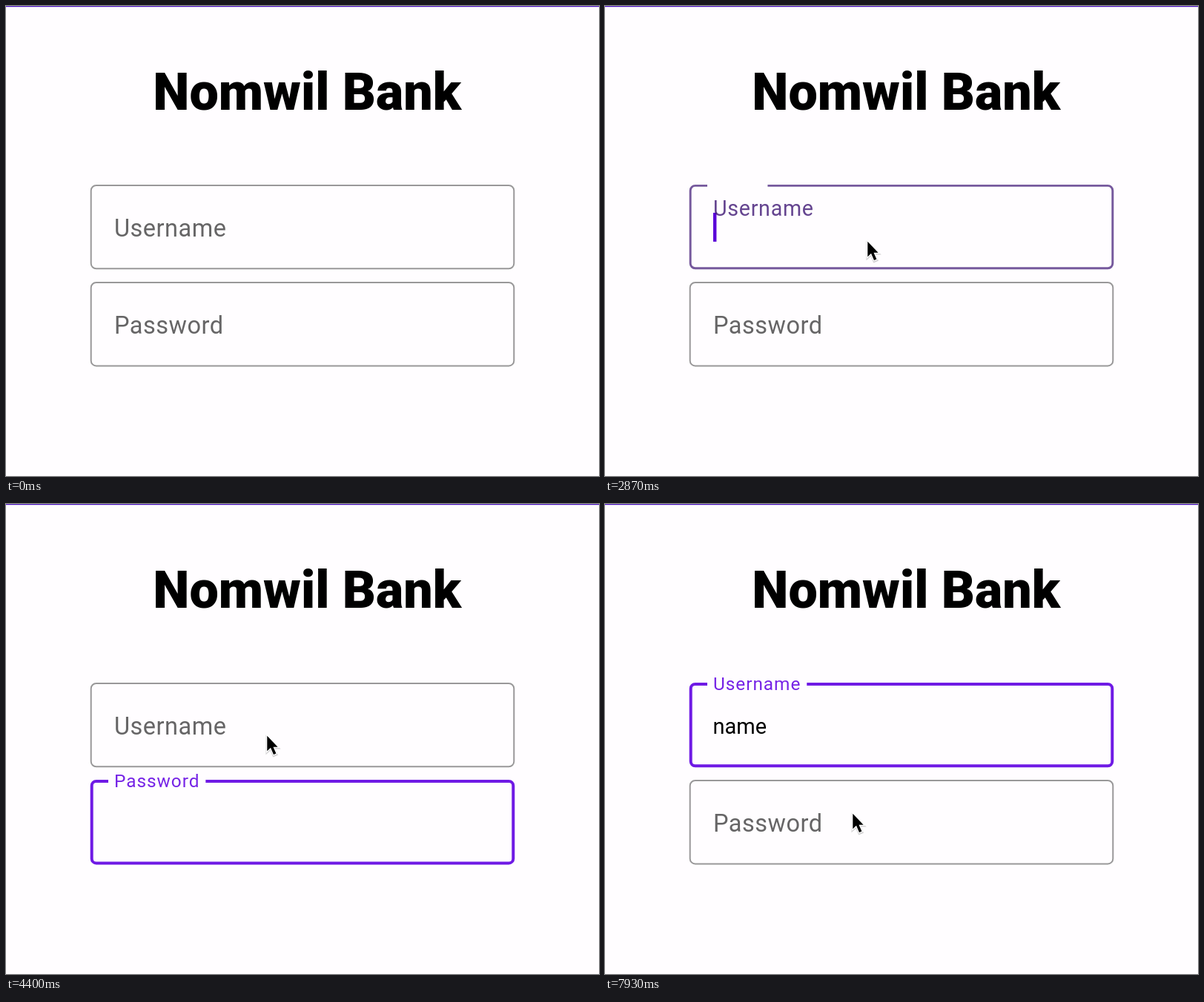
Write an HTML page that moves like this. It is 800 by 634 pixels and loops after 8 s.

```html
<!DOCTYPE html>
<html lang="en">
<head>
<meta charset="utf-8">
<title>Login form</title>
<style>
  html, body { margin: 0; width: 100%; height: 100%; overflow: hidden; background: #fffdff; }
  svg { display: block; width: 800px; height: 634px; font-family: Roboto, sans-serif; }
</style>
</head>
<body>
<svg id="stage" viewBox="0 0 800 634">
  <rect width="800" height="634" fill="#fffdff"/>
  <rect width="800" height="1.2" fill="#4a14bd"/>
  <text x="614" y="140" font-size="70" font-weight="800" text-anchor="end">Nomwil Bank</text>
  <g id="fields"></g>
  <g id="pointer">
    <path d="M0 3V23L5 18.5L9 27.5L13 26L9 17H15Z" opacity=".17" stroke="#000" stroke-width="3"/>
    <path d="M.3 .8V21.2L5 16.8L9 26L12.4 24.5L8.5 15.7H14.6Z" stroke="#fff" stroke-width="2.4" paint-order="stroke"/>
  </g>
</svg>
<script>
const LOOP = 8000, FADE = 150, BLINK = 500;
const PRIMARY = [106, 17, 228];
const KEYS = [6870, 7060, 7250, 7430];
// time, x, y of the pointer tip
const PATH = [
  [830, 288, 640], [1500, 336, 335], [1630, 342, 327], [1900, 344, 325],
  [2050, 344, 325], [2370, 341, 370], [2490, 341, 370], [2600, 354, 317],
  [2960, 354, 317], [3400, 358, 418], [4000, 358, 418], [4400, 352, 312],
  [5150, 352, 312], [5600, 338, 424], [6000, 338, 424], [6200, 334, 417]
];

const lerp = (a, b, p) => a + (b - a) * p;
const smooth = s => s * s * (3 - 2 * s);

// cubic-bezier(.4, 0, .2, 1)
function ease(u) {
  if (u <= 0) return 0;
  if (u >= 1) return 1;
  let lo = 0, hi = 1;
  for (let i = 0; i < 20; i++) {
    const s = (lo + hi) / 2, r = 1 - s;
    if (1.2 * r * r * s + 0.6 * r * s * s + s ** 3 < u) lo = s; else hi = s;
  }
  return smooth(lo);
}

function add(parent, tag, attrs, text = "") {
  const el = document.createElementNS("http://www.w3.org/2000/svg", tag);
  set(el, attrs);
  el.textContent = text;
  return parent.appendChild(el);
}

function set(el, attrs) {
  for (const name in attrs) el.setAttribute(name, attrs[name]);
}

const tint = (p, restAlpha, focusAlpha) =>
  `rgba(${PRIMARY.map(c => Math.round(c * p))},${lerp(restAlpha, focusAlpha, p)})`;

// toggles: times at which focus is alternately gained and lost
function makeField(top, name, toggles, keys, value) {
  const g = add(fields, "g", {});
  const box = add(g, "rect", { fill: "none" });
  const gap = add(g, "rect", { x: 138, y: top - 2, height: 8, fill: "#fffdff" });
  const input = add(g, "text", { x: 145.5, y: top + 69, "font-size": 29 });
  const caret = add(g, "rect", { y: top + 38, width: 4.4, height: 39, fill: "#5a00d8" });
  const label = add(g, "text", { x: 146 }, name);

  return t => {
    const past = toggles.filter(time => time <= t);
    const focused = past.length % 2 === 1;
    const moved = past.length ? ease((t - past[past.length - 1]) / FADE) : 1;
    const p = focused ? moved : 1 - moved;
    const stroke = lerp(2, 4, p);

    set(box, {
      x: 113.7 + stroke / 2, y: top + stroke / 2,
      width: 572.6 - stroke, height: 114.4 - stroke, rx: 8 - stroke / 2,
      stroke: tint(p, 0.4, 0.96), "stroke-width": stroke
    });
    set(label, {
      y: top + lerp(70.4, 10, p), fill: tint(p, 0.6, 0.92),
      "font-size": lerp(32.5, 24.4, p), "letter-spacing": lerp(0.5, 0.95, p)
    });
    set(gap, { width: p > 0 ? 18 + p * (label.getComputedTextLength() - 2) : 0 });

    const typed = keys.filter(time => time <= t);
    input.textContent = value.slice(0, typed.length);
    const last = Math.max(0, ...past, ...typed);
    const lit = focused && Math.floor((t - last) / BLINK) % 2 === 0;
    set(caret, {
      x: 146 + (typed.length ? input.getComputedTextLength() - 1 : 0),
      visibility: lit ? "visible" : "hidden"
    });
  };
}

function pointerAt(t) {
  const i = PATH.findIndex(k => k[0] > t);
  if (i === 0) return [-50, -50];
  if (i < 0) return PATH[PATH.length - 1].slice(1);
  const [t0, x0, y0] = PATH[i - 1], [t1, x1, y1] = PATH[i];
  const s = smooth((t - t0) / (t1 - t0));
  return [lerp(x0, x1, s), lerp(y0, y1, s)];
}

const fields = document.getElementById("fields");
const pointer = document.getElementById("pointer");
const drawFields = [
  makeField(240.9, "Username", [2820, 3805, 4968], KEYS, "name"),
  makeField(372, "Password", [3805, 4968], [], "")
];

const start = performance.now();
function frame() {
  const t = (performance.now() - start) % LOOP;
  drawFields.forEach(draw => draw(t));
  set(pointer, { transform: `translate(${pointerAt(t)})` });
  requestAnimationFrame(frame);
}
frame();
</script>
</body>
</html>
```
